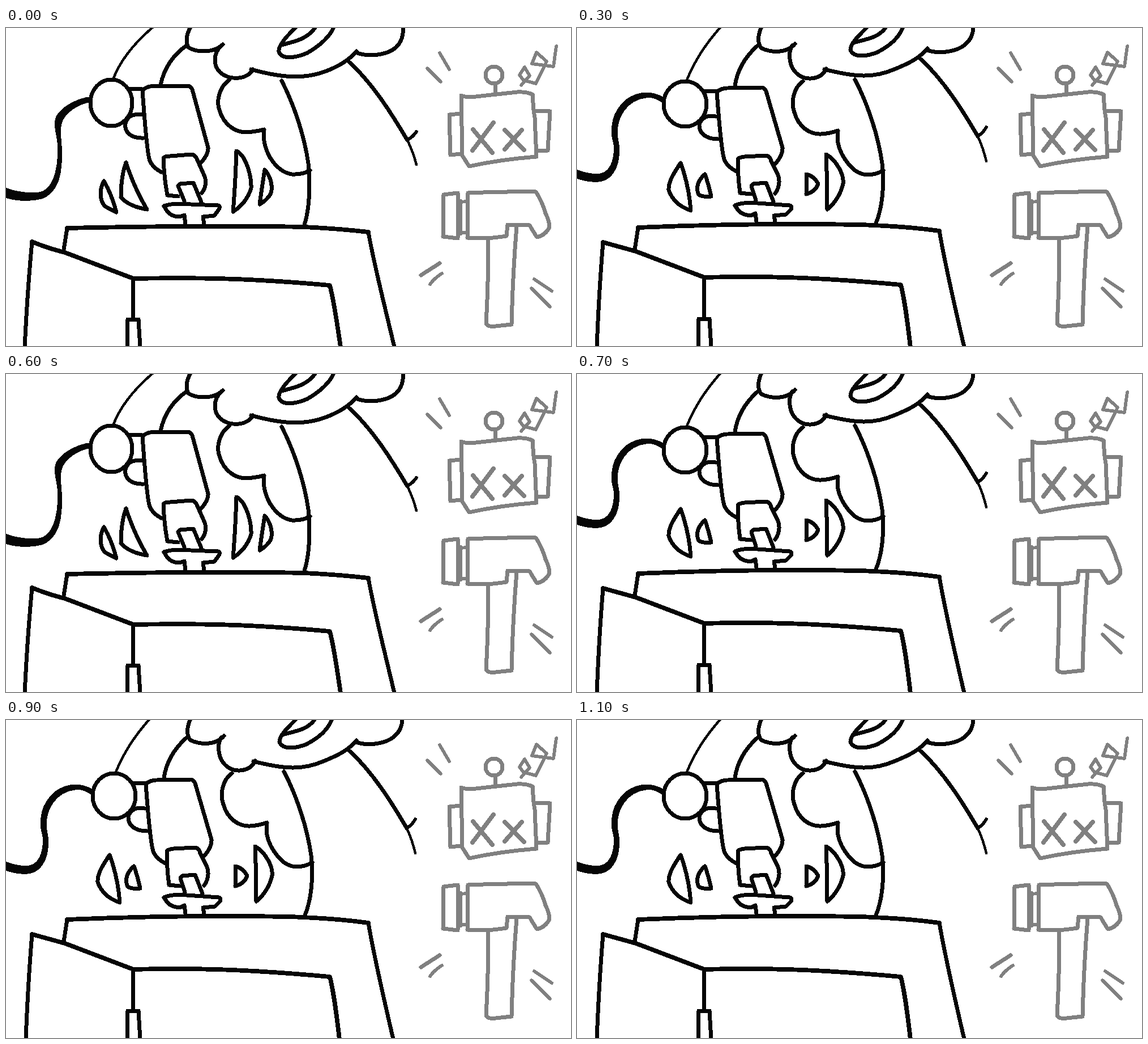
These frames come from a looping animation (998 by 561 pixels, 1.2 s). An HTML page:

```html
<!DOCTYPE html>
<html lang="en">
<head>
<meta charset="utf-8">
<title>Drilling</title>
<style>
  html, body { margin: 0; width: 100%; height: 100%; overflow: hidden; background: #fff; }
  svg { display: block; width: 100vw; height: 100vh; shape-rendering: crispEdges; }
  path, circle, ellipse { fill: none; stroke-linecap: round; stroke-linejoin: round; }
  .pose { stroke: #060606; stroke-width: 7; }
  .side { stroke: #808080; stroke-width: 7; }
  .thin { stroke-width: 4.5; }
  .mid { stroke-width: 5.8; }
  .bold { stroke-width: 7.8; }
  .cable { fill: #060606; stroke: none; }
  /* two drawings swap every 100 ms */
  .pose { animation: swap 200ms step-end infinite; }
  .back { animation-delay: -100ms; }
  @keyframes swap {
    0% { visibility: visible; }
    50%, 100% { visibility: hidden; }
  }
</style>
</head>
<body>
<svg viewBox="0 0 998 561">
  <g class="pose">
    <!-- arms and body -->
    <path class="thin" d="M260 -2C226 27 202 56 189 91"/>
    <path d="M319 31C297 46 280 69 273 100"/>
    <path d="M326 -2C319 11 317 24 322 34C335 43 367 45 383 29"/>
    <path d="M379 32C366 46 366 67 378 78C394 93 426 92 436 73"/>
    <path d="M433 73C476 85 520 92 560 78C586 69 606 57 619 41"/>
    <path d="M618 43C640 52 672 48 688 35C698 26 703 12 701 -2"/>
    <path d="M513 -2C498 12 480 31 482 42C487 57 514 52 532 44C553 32 573 15 579 -2"/>
    <path d="M487 30C508 24 533 20 547 -2"/>
    <path d="M606 60C647 97 682 152 709 198"/>
    <path class="thin" d="M709 198Q719 218 725 241"/>
    <path class="mid" d="M709 197Q717 194 725 183"/>
    <path d="M394 92C377 104 371 128 377 145C385 171 405 184 424 184Q441 183 456 179"/>
    <path d="M456 180C454 198 457 211 466 228C479 249 492 256 505 258Q524 259 537 251"/>
    <path d="M487 93C509 136 527 190 534 239C537 276 537 317 527 347"/>
    <!-- cable and drill -->
    <path class="cable" d="M150 121C125 123 87 143 86 165C85 185 93 195 91 225C90 255 80 289 55 290C35 291 15 288 0 282V300C20 306 45 307 65 301C90 290 98 265 99 230C100 205 95 190 98 170C102 150 130 133 150 131Z"/>
    <ellipse cx="186" cy="132" rx="37" ry="41"/>
    <path d="M218 107L241 108M240 153C226 151 214 155 211 169C209 184 221 195 243 194"/>
    <path d="M274 254Q259 246 254 234Q249 222 241 110Q249 102 265 102L322 102Q328 103 330 112L357 211Q358 222 345 237"/>
    <path d="M304 297L285 295Q279 263 278 229Q281 226 290 226L328 223Q335 224 338 233L351 262Q356 277 346 291"/>
    <path d="M315 305L304 279L307 275L331 273L345 307"/>
    <path d="M317 347L315 330L307 333Q293 333 285 324L279 314Q287 311 302 310L375 313Q379 315 376 320L368 331L348 333L350 347"/>
    <!-- bursts -->
    <path d="M173 270C165 284 165 302 174 314Q184 320 195 325Q187 294 173 270Z"/>
    <path d="M212 237C205 256 203 276 203 299Q218 315 249 320Q225 279 212 237Z"/>
    <path d="M407 217C423 224 434 260 433 283Q424 310 401 324Q405 279 407 217Z"/>
    <path d="M457 250C470 265 472 285 466 295Q458 306 448 311Q452 281 457 250Z"/>
    <!-- cabinet -->
    <path class="bold" d="M108 353C250 350 390 348 526 351Q589 354 640 360"/>
    <path d="M640 360C651 422 669 490 686 563M108 353L102 391M33 563Q38 462 46 377"/>
    <path class="bold" d="M46 377Q75 389 104 396L225 442C336 440 429 441 572 454C580 485 585 522 591 563"/>
    <path d="M224 443L225 512M214 563L215 514H234L237 563"/>
  </g>

  <g class="pose back">
    <!-- arms and body -->
    <path class="thin" d="M254 -2C228 27 208 57 194 92"/>
    <path d="M318 32C297 51 283 74 279 102"/>
    <path d="M326 -2C319 13 319 27 325 35C342 44 371 45 385 28"/>
    <path d="M380 31C372 45 375 69 388 80C403 94 431 92 440 72"/>
    <path d="M437 73C482 84 519 91 560 73C588 62 606 52 619 36"/>
    <path d="M618 39C642 47 672 41 686 29C696 20 700 10 700 -2"/>
    <path d="M513 -2C499 12 482 28 483 39C489 53 512 50 530 43C552 32 569 17 576 -2"/>
    <path d="M488 26C509 20 533 18 546 -2"/>
    <path d="M606 54C647 91 681 145 708 191"/>
    <path class="thin" d="M708 191Q718 213 723 235"/>
    <path class="mid" d="M707 191Q716 187 723 175"/>
    <path d="M399 94C383 105 377 130 384 149C391 174 411 188 431 187Q447 186 461 181"/>
    <path d="M461 182C458 199 463 216 473 231C485 249 496 257 511 259Q529 259 541 251"/>
    <path d="M491 91C514 135 532 190 539 239C543 276 540 317 527 347"/>
    <!-- cable and drill -->
    <path class="cable" d="M155 123C130 108 105 113 88 125C65 144 60 165 61 188C62 200 66 205 65 215C64 235 58 255 38 257C25 258 12 254 0 250V266C15 271 30 273 42 271C62 268 76 245 75 215C75 200 71 195 72 180C72 160 87 126 125 123C135 122 145 128 152 133Z"/>
    <ellipse cx="191" cy="134" rx="38" ry="40"/>
    <path d="M226 111L248 111M245 156C231 153 219 158 216 171C215 186 229 196 249 196"/>
    <path d="M282 253Q267 246 261 234Q255 222 247 113Q255 105 272 106L327 105Q333 106 335 115L363 211Q364 224 350 240"/>
    <path d="M307 293L288 291Q284 263 284 231Q287 228 296 227L335 225Q341 226 343 235L355 259Q361 276 350 292"/>
    <path d="M316 304L308 279L311 275L334 273L347 306"/>
    <path d="M317 342L315 327L307 331Q293 330 285 322L279 313Q288 309 305 308L376 313Q381 315 378 320L369 329L348 331L350 342"/>
    <!-- bursts -->
    <path d="M183 238C171 256 161 271 162 286Q171 312 201 322Q198 279 183 238Z"/>
    <path d="M226 258C214 268 209 282 215 294Q224 299 237 297Q232 274 226 258Z"/>
    <path d="M405 258Q419 261 426 275Q421 289 405 293Q406 275 405 258Z"/>
    <path d="M440 223C458 233 472 258 470 275Q463 303 442 320Q442 273 440 223Z"/>
    <!-- cabinet -->
    <path class="bold" d="M108 352C250 346 390 345 500 347Q584 350 640 358"/>
    <path d="M640 358C651 422 667 490 684 563M108 352L102 391M35 563Q39 462 46 378"/>
    <path class="bold" d="M46 378Q75 386 104 394L225 440C336 437 429 440 572 453C580 485 584 522 589 563"/>
    <path d="M224 440L225 512M214 563L215 513H234L237 563"/>
  </g>

  <g class="side">
    <!-- robot head -->
    <path d="M804 119Q813 123 830 121L903 113Q921 112 931 118Q930 137 934 158L937 227Q873 232 818 244L806 225Z"/>
    <path d="M803 151L783 153L785 224L803 222M933 146L961 147L957 216L938 216"/>
    <circle cx="862" cy="83" r="15"/>
    <path d="M864 98V117"/>
    <path class="bold" d="M825 179L859 220M861 167L824 216M881 180L915 215M911 180L881 214"/>
    <path class="mid" d="M910 101L925 84L916 69L907 83L914 92L936 98L955 59L937 43L929 63L967 68L972 32"/>
    <path class="mid" d="M744 71L768 95M766 44L783 73"/>
    <!-- hammer -->
    <path d="M773 294L798 291L799 310L798 371L772 368Z"/>
    <path class="mid" d="M803 307L814 306M803 361H814M803 305V363"/>
    <path d="M816 291Q877 288 936 289Q947 306 953 327Q960 341 960 351Q954 365 938 369Q933 362 925 348L886 347L884 367Q847 373 815 370Z"/>
    <path d="M852 373Q852 451 848 522Q853 528 865 526L893 523Q895 436 902 350"/>
    <path d="M733 436L766 415"/>
    <path class="mid" d="M749 452Q757 441 770 433M933 443L964 464M928 459L961 492"/>
  </g>
</svg>
</body>
</html>
```
